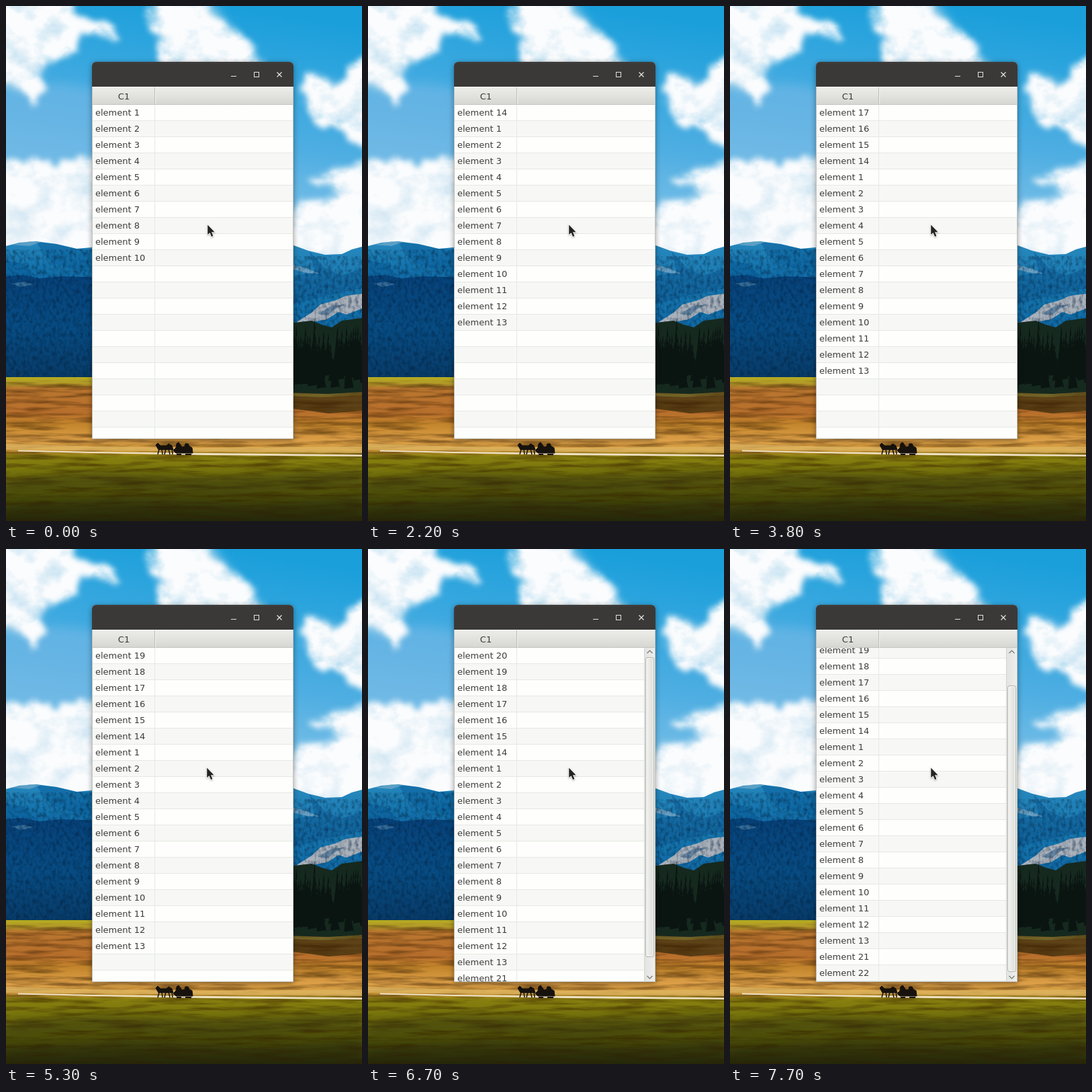
Write an HTML page that moves like this. It is 530x766 px and loops after 8 s.

```html
<!DOCTYPE html>
<html lang="en">
<head>
<meta charset="utf-8">
<title>Growing table</title>
<style>
  html, body { margin: 0; width: 100%; height: 100%; overflow: hidden; }
  body { position: relative; font: 13px "DejaVu Sans", sans-serif; color: #3c3c3a; }
  svg { position: absolute; display: block; }
  .scene { left: 0; top: 0; }
  .window { position: absolute; left: 128px; top: 83px; width: 300px; height: 561px;
    border-radius: 6px 6px 0 0; background: #c3c5c0; box-shadow: 0 2px 9px rgba(0, 0, 0, .4); }
  .bar { height: 37px; border-radius: 6px 6px 0 0; background: linear-gradient(#42403e, #3b3937 3px); }
  .bar svg { left: 0; top: 0; }
  .head { position: absolute; left: 0; top: 37px; width: 300px; height: 27px; box-sizing: border-box;
    overflow: hidden; line-height: 27px; border: 1px solid #c3c5c0; border-top-color: #f4f5f2;
    background: linear-gradient(#ecede9, #e2e3df 50%, #d6d7d3); }
  .head span { display: block; width: 91px; padding-left: 1px; text-align: center;
    border-right: 1px solid #b9bab6; box-shadow: 1px 0 #f6f6f4; }
  .view { position: absolute; left: 1px; top: 64px; width: 298px; height: 496px; overflow: hidden; background: #fefffc; }
  .row { height: 24px; box-sizing: border-box; border-bottom: 1px solid #e6e8e4; background: #fefffc; }
  .row:nth-child(even) { background: #f7f8f5; }
  .cell { width: 88px; height: 23px; padding-left: 4px;
    line-height: 23px; white-space: pre; border-right: 1px solid #e6e8e4; }
  .scroll { position: absolute; right: 0; top: 0; width: 16px; height: 496px; box-sizing: border-box;
    border-left: 1px solid #d3d5d0; background: linear-gradient(90deg, #e3e4e1, #eeefec); }
  .thumb { position: absolute; left: 1px; top: 0; width: 13px; box-sizing: border-box;
    border: 1px solid #afb1ac; border-radius: 3px; box-shadow: inset 0 0 0 1px #fafaf8;
    background: linear-gradient(90deg, #f2f3f0, #dddeda); }
  .scroll svg { left: 0; top: 0; }
  .cursor { left: 296px; top: 322px; }
  .cursor path { paint-order: stroke; filter: drop-shadow(.5px 1px 1px rgba(0, 0, 0, .3)); }
</style>
</head>
<body>
<svg class="scene" width="530" height="766" viewBox="0 0 530 766">
  <defs>
    <linearGradient id="sky" x1=".6" x2=".4" y2="1">
      <stop stop-color="#1a9fdb"/><stop offset=".5" stop-color="#4faee2"/><stop offset="1" stop-color="#9fcfec"/>
    </linearGradient>
    <linearGradient id="ridge" x2="0" y2="1">
      <stop stop-color="#2788bd"/><stop offset=".5" stop-color="#1474ad"/><stop offset="1" stop-color="#0d5f9d"/>
    </linearGradient>
    <linearGradient id="forest" x2="0" y2="1">
      <stop stop-color="#07427a"/><stop offset=".5" stop-color="#074c83"/><stop offset="1" stop-color="#083b68"/>
    </linearGradient>
    <linearGradient id="field" gradientUnits="userSpaceOnUse" x1="0" y1="552" x2="0" y2="766">
      <stop stop-color="#b5ac20"/><stop offset=".05" stop-color="#b2962a"/>
      <stop offset=".08" stop-color="#b9762f"/><stop offset=".25" stop-color="#b86f2c"/>
      <stop offset=".33" stop-color="#c4862c"/><stop offset=".44" stop-color="#dc9f48"/>
      <stop offset=".51" stop-color="#d0993a"/><stop offset=".55" stop-color="#88800f"/>
      <stop offset=".67" stop-color="#76740d"/><stop offset=".83" stop-color="#4b4e0a"/>
      <stop offset="1" stop-color="#242907"/>
    </linearGradient>
    <filter id="fluff" x="-10%" y="-10%" width="120%" height="120%" color-interpolation-filters="sRGB">
      <feTurbulence type="fractalNoise" baseFrequency=".05" numOctaves="4" seed="5" result="n"/>
      <feDisplacementMap in="SourceGraphic" in2="n" scale="26" xChannelSelector="R" yChannelSelector="G"/>
      <feGaussianBlur stdDeviation="4" result="d"/>
      <feTurbulence type="fractalNoise" baseFrequency=".022 .028" numOctaves="5" seed="12"/>
      <feColorMatrix values="0 0 0 0 1  0 0 0 0 1  0 0 0 0 1  1.6 0 0 0 .1"/>
      <feComposite in="d" operator="in"/>
    </filter>
    <filter id="soft"><feGaussianBlur stdDeviation="8"/></filter>
    <filter id="grain" x="0" y="0" width="1" height="1" color-interpolation-filters="sRGB">
      <feTurbulence type="fractalNoise" baseFrequency=".2 .14" numOctaves="3" seed="3"/>
      <feColorMatrix values="0 0 0 0 0  0 0 0 0 .1  0 0 0 0 .2  2 0 0 0 -.8"/>
      <feComposite in2="SourceGraphic" operator="in"/>
    </filter>
    <filter id="streak" x="0" y="0" width="1" height="1" color-interpolation-filters="sRGB">
      <feTurbulence type="fractalNoise" baseFrequency=".014 .16" numOctaves="4" seed="8"/>
      <feColorMatrix values="0 0 0 0 .2  0 0 0 0 .1  0 0 0 0 0  2.4 0 0 0 -.95"/>
      <feComposite in2="SourceGraphic" operator="in"/>
    </filter>
  </defs>
  <rect width="530" height="380" fill="url(#sky)"/>
  <ellipse cx="70" cy="175" rx="120" ry="60" fill="#74b9e6" opacity=".6" filter="url(#soft)"/>
  <g fill="#d3e5f1" opacity=".75" filter="url(#soft)">
    <path d="M-20-20H90L110 45 60 80 35 125-20 118Z"/>
    <path d="M228-10H300L345 50 375 85H245L225 35Z"/>
    <path d="M455 105L500 120 545 85V200L500 175 455 150Z"/>
    <path d="M545 235L500 255 500 290 435 310V385H545Z"/>
    <path d="M-20 238L70 248 140 235V370H-20Z"/>
  </g>
  <g fill="#fbfcfd" filter="url(#fluff)">
    <path d="M-30-30H88L110 14 148 24 172 44 160 54 128 38 105 50 112 65 85 76 60 82 48 108 60 122 42 146 34 148 25 126 0 113-30 118Z"/>
    <path d="M222-10H298L314 18 346 43 372 62 382 90 350 100H245L220 70 235 50 208 30Z"/>
    <path d="M447 95L465 104 480 117 505 110 514 88 545 72V202L515 205 495 178 470 180 444 153 438 120Z"/>
    <path d="M545 218L510 238 480 247 452 252 462 265 490 275 475 290 440 290 420 310V390H545Z"/>
    <path d="M-30 227L20 233 45 225 75 237 100 230 150 217V390H-30Z"/>
  </g>
  <path fill="url(#ridge)" d="M0 357L20 352 45 350 75 354 105 361 140 358V425H0Z"/>
  <path fill="#0a5f9c" opacity=".55" d="M45 351L58 372 78 386 128 398V362L105 361 75 354ZM0 378L28 384 45 402H0Z"/>
  <path fill="#72abc9" d="M10 355L35 350 52 351 35 357Z" opacity=".7"/>
  <path fill="url(#forest)" d="M0 402L25 400 50 405 85 402 140 404V554H0Z"/>
  <path fill="#4f83a9" opacity=".65" d="M8 413L28 410 40 414 22 418Z"/>
  <path fill="url(#ridge)" d="M420 353L450 364 475 370 500 369 515 362 530 358V520H420Z"/>
  <path fill="#0d5790" opacity=".5" d="M452 365L474 389 500 401 530 390V420L480 430 420 446V402L460 397Z"/>
  <path fill="#91b5cf" opacity=".65" d="M428 385L448 390 466 398 446 397 428 392Z"/>
  <path fill="#a9b1bb" d="M430 472L455 456 468 444 490 438 506 431 530 428V450L507 459 495 455 478 466 450 471Z"/>
  <path fill="#547999" opacity=".8" d="M464 458L484 446 505 444 489 451 480 460Z"/>
  <path filter="url(#grain)" opacity=".5" d="M0 362H140V552H0ZM420 372H530V490H420Z"/>
  <rect y="552" width="530" height="214" fill="url(#field)"/>
  <path fill="#5e4217" d="M420 570H530V602L480 606 420 598Z"/>
  <path fill="#756629" d="M420 575L470 577 530 574V579L470 582 420 580Z"/>
  <rect y="557" width="530" height="209" filter="url(#streak)" opacity=".5"/>
  <path fill="#e1b965" opacity=".7" d="M0 651L130 655 300 657 530 655V665L300 663 0 660Z"/>
  <path fill="#efe1c5" d="M18 660.5L130 663 300 665 530 667.5V670L300 668 130 665 18 662.5Z"/>
  <path fill="#252609" opacity=".4" d="M0 704L130 692 310 700 530 689V712L330 726 130 714 0 723ZM0 742L180 730 390 742 530 728V766H0Z" filter="url(#soft)"/>
  <path fill="#16291f" d="M420 472L455 468 470 474 485 478 500 468 530 464V574L480 577 420 575Z"/>
  <path id="trees" fill="#0a1512"/>
  <g fill="#17120d" stroke="#17120d">
    <path d="M223 653L226 650 230 654H239L242 651 247 654 249 660H227Z"/>
    <path fill="none" stroke-width="1.5" d="M228 659L226 667M232 659L233 667M238 659L236 667M242 659L244 667M247 658L248 667"/>
    <path d="M249 661L253 657 254 651 257 649 260 653 262 656 266 655 267 651 271 651 273 655 277 657 278 665H253Z"/>
    <path fill="none" stroke-width="2" d="M254 667H261M267 667H276"/>
  </g>
</svg>

<div class="window">
  <div class="bar">
    <svg width="300" height="37" fill="none" stroke="#e4e3df">
      <path d="M207 21.5H215"/><rect x="241.5" y="15.5" width="7" height="7"/>
      <path stroke-width="1.3" d="M275.5 15.5L282.5 22.5M282.5 15.5L275.5 22.5"/>
    </svg>
  </div>
  <div class="head"><span>C1</span></div>
  <div class="view">
    <div id="rows"></div>
    <div class="scroll" id="scroll">
      <div class="thumb" id="thumb"></div>
      <svg width="15" height="496" fill="none" stroke="#6f726d" stroke-width="1.1">
        <path d="M3.5 8L7.5 4 11.5 8M3.5 488L7.5 492 11.5 488"/>
      </svg>
    </div>
  </div>
</div>
<svg class="cursor" id="cursor" width="24" height="28">
  <path fill="#242424" stroke="#fff" stroke-width="1.6" d="M3.2 3.5V18L6.5 15.2 9 21 11.4 20 9 14.3H13.6Z"/>
</svg>

<script>
const LOOP = 8000, ROWS = 22;
const $ = id => document.getElementById(id);

// Times at which elements 11, 12, ... 22 join; 14 to 20 go on top
const adds = [500, 1100, 1700, 2200, 3100, 3300, 3800, 4700, 5300, 6200, 6700, 7700];
// Time, list offset, thumb top, thumb height
const scrolls = [[6700, 0, 14, 446], [7000, 8, 36, 446], [7700, 32, 56, 426]];

function plantTrees() {
  let seed = 7, d = "";
  const rnd = () => (seed = seed * 16807 % 2147483647) / 2147483647;
  for (let i = 0; i < 34; i++) {
    const x = 422 + i * 3.4;
    const gap = Math.exp(-(((x - 485) / 11) ** 2));
    const top = 460 + rnd() * 42 + gap * 24, base = 540 + rnd() * 32;
    d += `M${x} ${top}`;
    for (let k = 1; k < 6; k++) {
      const y = top + (base - top) * k / 5;
      d += `L${x + k * 1.5} ${y}l-2 -2`;
    }
    d += `L${x - 7} ${base}Z`;
  }
  $("trees").setAttribute("d", d);
}

const cells = Array.from({ length: ROWS }, () => {
  const row = document.createElement("div");
  const cell = document.createElement("div");
  row.className = "row";
  cell.className = "cell";
  row.append(cell);
  $("rows").append(row);
  return cell;
});

function elementsFor(count) {
  const list = [];
  for (let n = 1; n <= 10 + count; n++) {
    if (n >= 14 && n <= 20) list.unshift(n);
    else list.push(n);
  }
  return list;
}

let shown = "";
function draw(t) {
  const count = adds.filter(at => at <= t).length;
  const pos = scrolls.filter(s => s[0] <= t).pop();
  const key = count + "/" + pos;
  if (key === shown) return;
  shown = key;

  const list = elementsFor(count);
  cells.forEach((cell, i) => { cell.textContent = list[i] ? "element " + list[i] : ""; });
  $("cursor").style.transform = `translateX(${count ? 0 : 1}px)`;
  $("scroll").style.display = pos ? "block" : "none";
  const [, offset, top, height] = pos || [0, 0, 0, 0];
  $("rows").style.transform = `translateY(${-offset}px)`;
  $("thumb").style.top = top + "px";
  $("thumb").style.height = height + "px";
}

plantTrees();
const start = performance.now();
function tick() {
  draw((performance.now() - start) % LOOP);
  requestAnimationFrame(tick);
}
tick();
</script>
</body>
</html>
```
